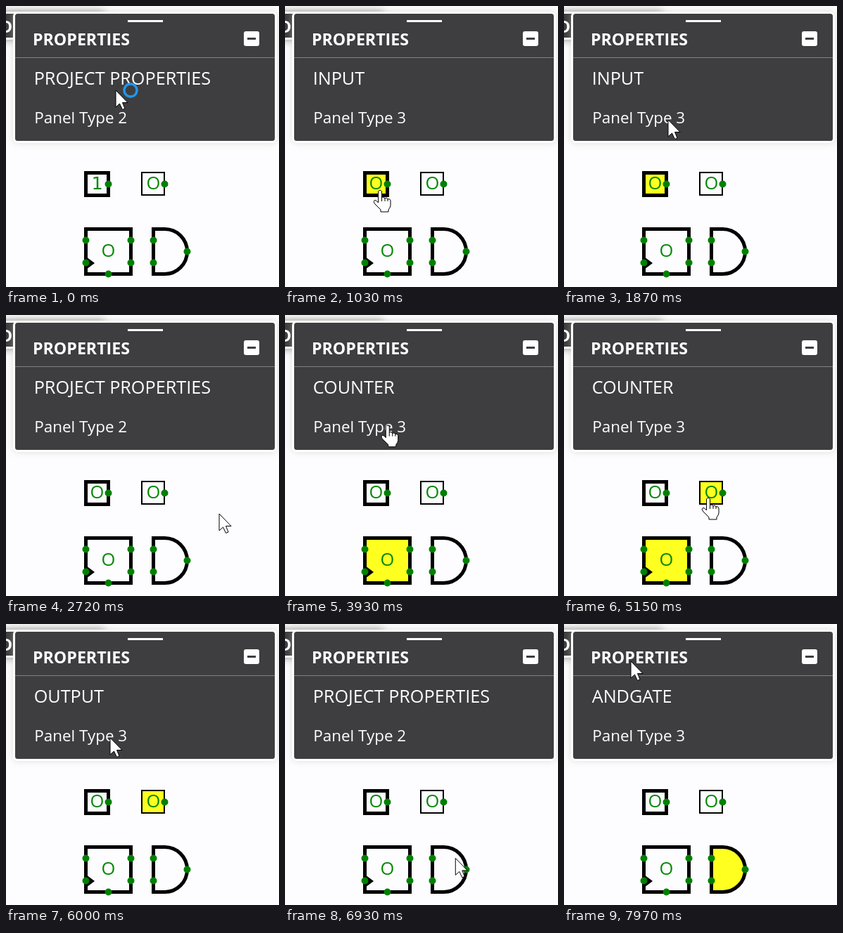
An HTML page that plays this animation: 388x400 px, repeating every 8000 ms.

```html
<!DOCTYPE html>
<html lang="en">
<head>
<meta charset="utf-8">
<title>Circuit properties</title>
<style>
  html, body { margin: 0; width: 100%; height: 100%; overflow: hidden; background: #fdfdff; }
  svg { display: block; width: 388px; height: 400px; }
  text { font-family: "Open Sans", "Noto Sans", sans-serif; fill: #fff; }
  .bold { font-weight: 700; font-size: 23.2px; }
  .value { font-size: 25.5px; fill: #088808; text-anchor: middle; }
  .value.one { font-family: "DejaVu Sans", sans-serif; }
  .panel { fill: #3e3e40; stroke: #fff; stroke-width: 3; }
  .back { filter: drop-shadow(0 0 6px rgba(60, 60, 50, .6)); }
  .front { filter: drop-shadow(0 0 5px rgba(190, 190, 175, .5)); }
  .part { stroke: #000; stroke-width: 5; fill: #fdfdff; }
  .part.lit { fill: #ffff20; }
  .pins { stroke: #008000; stroke-width: 10; stroke-linecap: round; }
  .cursor { fill: #fff; stroke: #000; stroke-linejoin: round; }
</style>
</head>
<body>
<svg viewBox="0 0 388 400">
  <rect class="panel back" x="-60" y="9.5" width="199" height="37" rx="4"/>
  <text class="bold" x="-8" y="38">D</text>

  <rect class="panel front" x="11.5" y="9.5" width="372" height="184" rx="5"/>
  <path d="M173 21.5H223" stroke="#fff" stroke-width="3"/>
  <path d="M13 73.5H382" stroke="#828280"/>
  <rect x="338" y="36" width="22" height="21" rx="3" fill="#fff"/>
  <rect x="343" y="45" width="12" height="3" fill="#3e3e40"/>
  <text class="bold" x="38" y="55.5">PROPERTIES</text>
  <text id="title" x="39.7" y="112" font-size="25.2"></text>
  <text id="type" x="40.3" y="167" font-size="22.4"></text>

  <rect class="part" id="input" x="113.5" y="237.5" width="32" height="32"/>
  <rect class="part" id="output" x="193" y="237" width="32" height="32" style="stroke-width:2"/>
  <rect class="part" id="counter" x="113.5" y="317.5" width="64" height="64"/>
  <path d="M114 357L126 366L114 375Z"/>
  <path class="part" id="gate" d="M209.5 317.5H225.5A32 32 0 0 1 225.5 381.5H209.5Z"/>
  <text class="value" id="inputValue" x="129.5" y="260.5"></text>
  <text class="value" x="209.5" y="260.5">O</text>
  <text class="value" x="145.5" y="356.5">O</text>
  <path class="pins" transform="translate(.5 .5)" d="M145 253h0M225 253h0M113 333h0M177 333h0M113 365h0M177 365h0M145 381h0M209 333h0M209 365h0M257 349h0"/>

  <g id="pointer">
    <path class="cursor" id="arrow" d="M0 0V24L5.5 19L9.5 27.5L13 26L9.5 17.5H17Z"/>
    <g id="hand">
      <path class="cursor" d="M-2.5 2Q0-1.5 2.5 2V10.5Q5 8.5 7 12Q9.5 9.5 11 13Q14 11.5 15 15V22Q14.5 25 12 28V31H1V28L-7 20Q-10.5 15.5-7 14.5Q-5 14.5-2.5 18Z"/>
      <path d="M2.5 10V16M7 12V16M11 13V16" stroke="#000" fill="none"/>
    </g>
    <circle id="busy" cx="21" cy="0" r="9" fill="none" stroke="#2196ea" stroke-width="3.5"/>
  </g>
</svg>
<script>
const LOOP = 8000;
const $ = id => document.getElementById(id);
const spot = (x, y) => ({ x, y });

const title = spot(146, 88), type = spot(148, 162);

// A part is visited, clicked, and then its properties are read in the panel.
const visit = (id, at, arrive, click, leave) => ({ id, at, arrive, click, leave });
const rest = (at, arrive, leave = arrive, click) => ({ id: '', at, arrive, leave, click });
const readPanel = from => [
  rest(title, from + 270, from + 550),
  rest(type, from + 720, from + 800)
];

const stops = [
  rest(spot(156, 120), 0, 120, 0),
  visit('input', spot(135, 262), 800, 1000, 1080),
  ...readPanel(1080),
  rest(spot(303, 295), 2600, 2650, 2690),
  rest(spot(303, 283), 2720, 3040),
  visit('counter', spot(145, 358), 3480, 3580, 3750),
  ...readPanel(3750),
  visit('output', spot(205, 260), 5050, 5210, 5260),
  ...readPanel(5260),
  rest(spot(321, 308), 6350, 6700, 6430),
  visit('gate', spot(228, 338), 7007, 7160, 7500),
  rest(spot(95, 53), 7970, LOOP)
];

const names = { '': 'PROJECT PROPERTIES', input: 'INPUT', counter: 'COUNTER', output: 'OUTPUT', gate: 'ANDGATE' };
const show = (id, visible) => $(id).setAttribute('visibility', visible ? 'visible' : 'hidden');

function pointerAt(t) {
  const i = stops.findIndex(stop => stop.leave > t);
  const next = stops[i];
  if (t >= next.arrive) return [next.at.x, next.at.y];
  const last = stops[i - 1];
  const u = (t - last.leave) / (next.arrive - last.leave);
  const ease = u * u * (3 - 2 * u);
  return [
    last.at.x + (next.at.x - last.at.x) * ease,
    last.at.y + (next.at.y - last.at.y) * ease
  ];
}

function draw(t) {
  const selected = stops.filter(stop => stop.click <= t).pop().id;
  // The hand cursor lingers briefly after leaving a part.
  const hovered = stops.find(stop => stop.id && t > stop.arrive - 50 && t < stop.leave + 200);

  $('title').textContent = names[selected];
  $('type').textContent = 'Panel Type ' + (selected ? 3 : 2);
  for (const id of ['input', 'counter', 'output', 'gate']) {
    $(id).classList.toggle('lit', id === selected || id === hovered?.id);
  }

  const on = t < stops[1].click;
  $('inputValue').textContent = on ? '1' : 'O';
  $('inputValue').classList.toggle('one', on);

  show('hand', hovered);
  show('arrow', !hovered);
  show('busy', t < 350);
  $('pointer').setAttribute('transform', `translate(${pointerAt(t)})`);
}

function tick() {
  draw(performance.now() % LOOP);
  requestAnimationFrame(tick);
}
tick();
</script>
</body>
</html>
```
